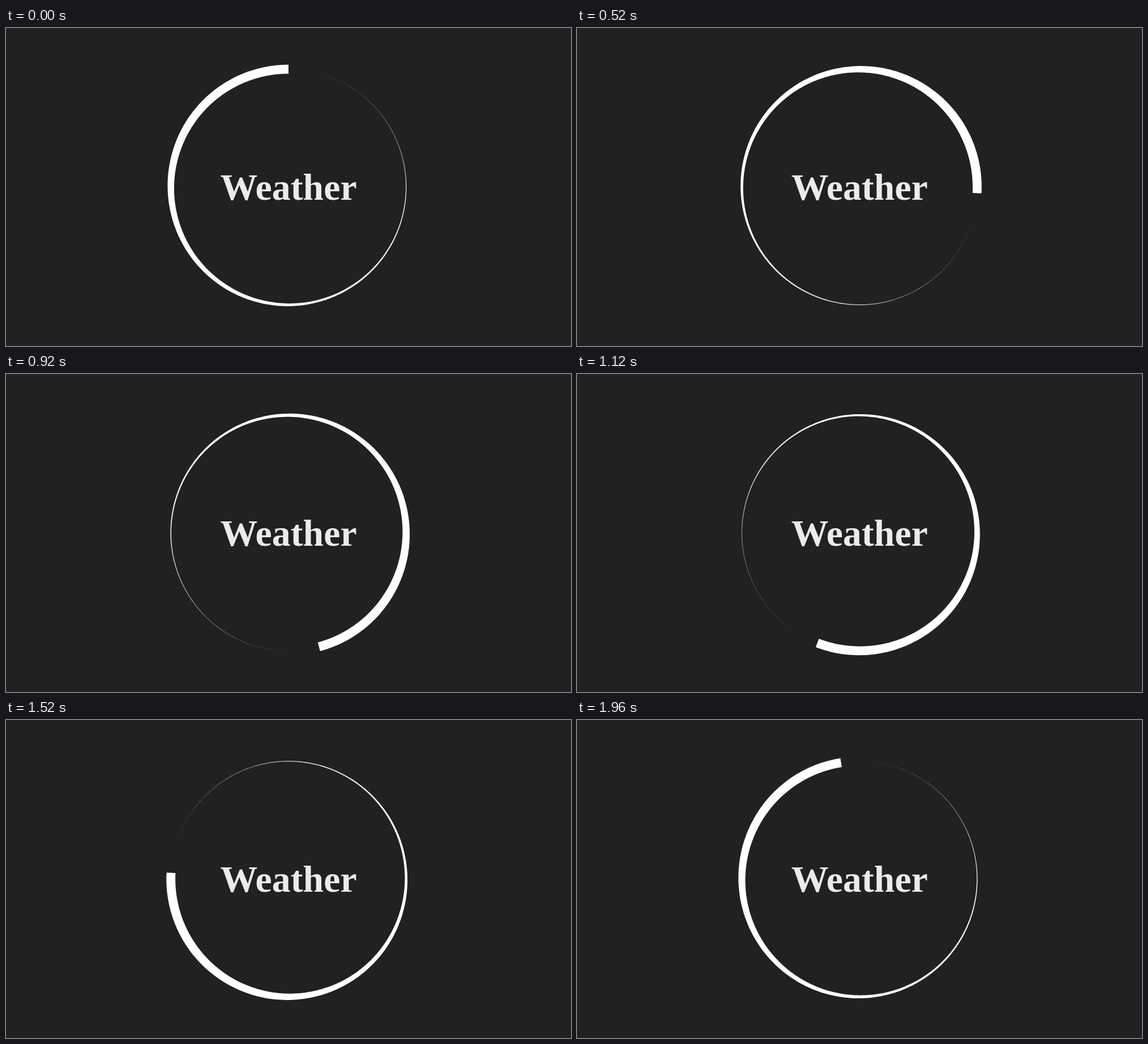
Write an HTML page that moves like this. It is 998 by 561 pixels and loops after 2000 ms.

```html
<!DOCTYPE html>
<html lang="en">
<head>
<meta charset="utf-8">
<title>Weather</title>
<style>
  html, body { margin: 0; width: 100%; height: 100%; overflow: hidden; background: #212121; }
  svg { display: block; width: 100vw; height: 100vh; }
  text { font: bold 65.8px "Liberation Serif", "Times New Roman", serif; fill: #ebebeb; text-anchor: middle; }
</style>
</head>
<body>
<svg viewBox="0 0 998 561">
  <rect width="998" height="561" fill="#212121"/>
  <g id="ring" fill="#fff" stroke="#fff" stroke-width="0"></g>
  <text x="499" y="303">Weather</text>
</svg>
<script>
const LOOP = 2000, STEP = 40, TICK = 1000 / 60;
const CX = 499, CY = 280.5, RADIUS = 207.8;
const BODY_PARTS = 200, TAIL_PARTS = 40, TAIL_START = 0.762;
const ring = document.getElementById('ring');

// Stroke width at u, from the head (0) to the end of the tail (1).
const strokeWidth = u => (1 - u) ** 2 * (15.8 + 38 * u * (1 - u) ** 2.5);

// Point at u along a ring whose head is at twelve o'clock.
function point(u, radius) {
  const a = -2 * Math.PI * u;
  return (CX + radius * Math.sin(a)).toFixed(3) + ' ' + (CY - radius * Math.cos(a)).toFixed(3);
}

function addPath(attributes) {
  const path = document.createElementNS('http://www.w3.org/2000/svg', 'path');
  for (const name in attributes) path.setAttribute(name, attributes[name]);
  ring.append(path);
}

function buildBody() {
  const outer = [], inner = [];
  for (let i = 0; i <= BODY_PARTS; i++) {
    const u = TAIL_START * i / BODY_PARTS, half = strokeWidth(u) / 2;
    outer.push(point(u, RADIUS + half));
    inner.unshift(point(u, RADIUS - half));
  }
  addPath({ d: 'M' + outer.concat(inner).join('L') + 'Z' });
}

// Below one pixel the stroke fades instead of getting thinner.
function buildTail() {
  const size = (1 - TAIL_START) / TAIL_PARTS;
  for (let i = 0; i < TAIL_PARTS; i++) {
    const u = TAIL_START + i * size;
    addPath({
      d: `M${point(u, RADIUS)}A${RADIUS} ${RADIUS} 0 0 0 ${point(u + size, RADIUS)}`,
      fill: 'none',
      'stroke-width': 1,
      'stroke-opacity': Math.min(1, strokeWidth(u + size / 2)).toFixed(3)
    });
  }
}

function render(ms) {
  const shown = Math.floor(ms % LOOP / STEP) * STEP;
  const ticks = Math.floor(shown / TICK + 1e-6);
  ring.setAttribute('transform', `rotate(${ticks * 3} ${CX} ${CY})`);
}

buildBody();
buildTail();
const start = performance.now();
function frame() {
  render(performance.now() - start);
  requestAnimationFrame(frame);
}
render(0);
requestAnimationFrame(frame);
</script>
</body>
</html>
```
